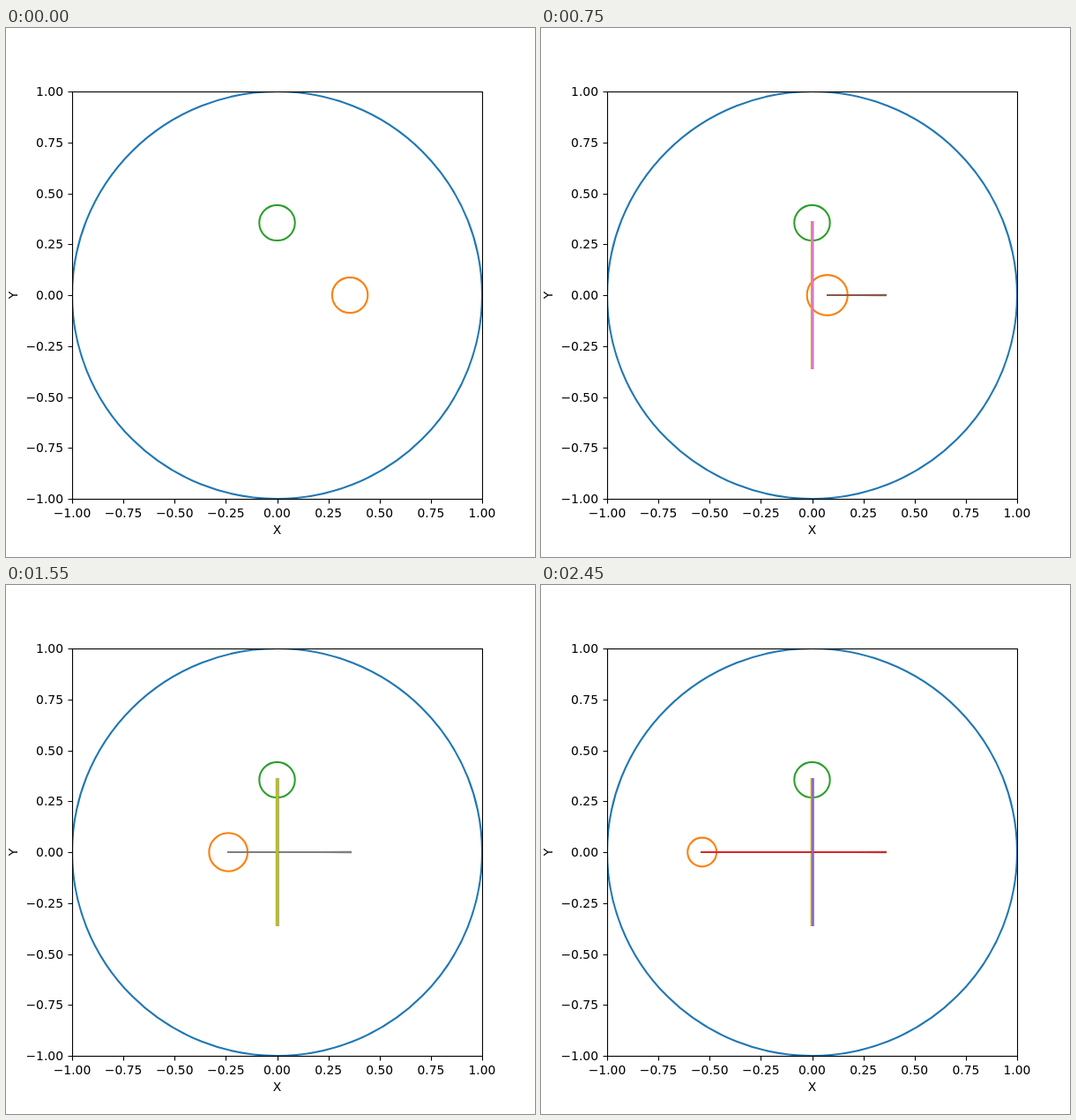
Recreate the animation shown at these times as an HTML page with a canvas. Size 600x600 px, loop 2500 ms.

```html
<!DOCTYPE html>
<html lang="en">
<head>
<meta charset="utf-8">
<title>Hyperbolic circles</title>
<style>
  html, body { margin: 0; width: 100%; height: 100%; overflow: hidden; background: #fff; }
  svg, canvas { position: absolute; left: 0; top: 0; display: block; }
  text { font: 13.889px "DejaVu Sans", sans-serif; fill: #000; }
  .axis { fill: none; stroke: #000; stroke-width: 1.111; }
</style>
</head>
<body>
<svg width="600" height="600" viewBox="0 0 600 600">
  <clipPath id="area"><rect x="75" y="72" width="465" height="462"/></clipPath>
  <ellipse cx="307.5" cy="303" rx="232.5" ry="231" fill="none" stroke="#1f77b4" stroke-width="2.083" clip-path="url(#area)"/>
  <rect class="axis" x="75.5" y="72.5" width="465" height="462"/>
  <path id="ticks" class="axis"/>
  <g id="labels"></g>
  <text x="307.5" y="574" text-anchor="middle">X</text>
  <text transform="translate(13 303) rotate(-90)" text-anchor="middle">Y</text>
</svg>
<canvas id="view" width="600" height="600"></canvas>
<script>
const CX = 307.5, CY = 303, RX = 232.5, RY = 231;
const LINE = 2.083, STEP = 50, COUNT = 50;
const START = 0.375, SPEED = 0.02, RADIUS = 0.1;
const COLORS = ['#1f77b4', '#ff7f0e', '#2ca02c', '#d62728', '#9467bd',
                '#8c564b', '#e377c2', '#7f7f7f', '#bcbd22', '#17becf'];
const ctx = document.getElementById('view').getContext('2d');
const labels = document.getElementById('labels');

function addLabel(text, x, y, anchor) {
  const el = document.createElementNS('http://www.w3.org/2000/svg', 'text');
  el.setAttribute('x', x);
  el.setAttribute('y', y);
  el.setAttribute('text-anchor', anchor);
  el.textContent = text;
  labels.append(el);
}

function buildAxes() {
  let d = '';
  for (let v = -1; v <= 1; v += 0.25) {
    const text = v.toFixed(2).replace('-', '\u2212');
    const x = CX + v * RX, y = CY - v * RY;
    d += `M${Math.round(x) + 0.5} 534.5v5M75.5 ${Math.round(y) + 0.5}h-5`;
    addLabel(text, x, 555, 'middle');
    addLabel(text, 65, Math.round(y) + 5, 'end');
  }
  document.getElementById('ticks').setAttribute('d', d);
}

// Disc-model circle whose centre lies at hyperbolic offset a along an axis
function circle(a, vertical, color) {
  const hi = Math.tanh(a + RADIUS), lo = Math.tanh(a - RADIUS);
  const c = (hi + lo) / 2, r = (hi - lo) / 2;
  ctx.strokeStyle = color;
  ctx.lineWidth = LINE;
  ctx.beginPath();
  ctx.ellipse(CX + (vertical ? 0 : c * RX), CY - (vertical ? c * RY : 0),
              r * RX, r * RY, 0, 0, 2 * Math.PI);
  ctx.stroke();
}

function segment(x1, y1, x2, y2, color, width = LINE) {
  ctx.strokeStyle = color;
  ctx.lineWidth = width;
  ctx.beginPath();
  ctx.moveTo(x1, y1);
  ctx.lineTo(x2, y2);
  ctx.stroke();
}

const offset = n => START - SPEED * n;
const reach = Math.tanh(START);
const right = Math.round(CX + reach * RX);
const top_ = Math.round(CY - reach * RY), bottom = Math.round(CY + reach * RY);

function draw(step) {
  ctx.clearRect(0, 0, 600, 600);
  circle(offset(step), false, COLORS[1]);
  circle(START, true, COLORS[2]);
  // Each step adds a new pair of lines over the earlier ones
  for (let n = 1; n <= step; n++) {
    const hue = (5 + 2 * n) % 10, next = (hue + 1) % 10;
    const tip = Math.round(CX + Math.tanh(offset(n)) * RX);
    segment(tip - 1, CY, right + 1, CY, COLORS[hue]);
    const wide = next === 8;
    const x = wide ? 307.5 : 308;
    segment(x, top_ - 1, x, bottom + 1, COLORS[next], wide ? LINE + 1 : LINE);
  }
}

let shown = -1;
function tick() {
  const step = Math.floor(performance.now() / STEP) % COUNT;
  if (step !== shown) draw(shown = step);
  requestAnimationFrame(tick);
}

buildAxes();
tick();
</script>
</body>
</html>
```
